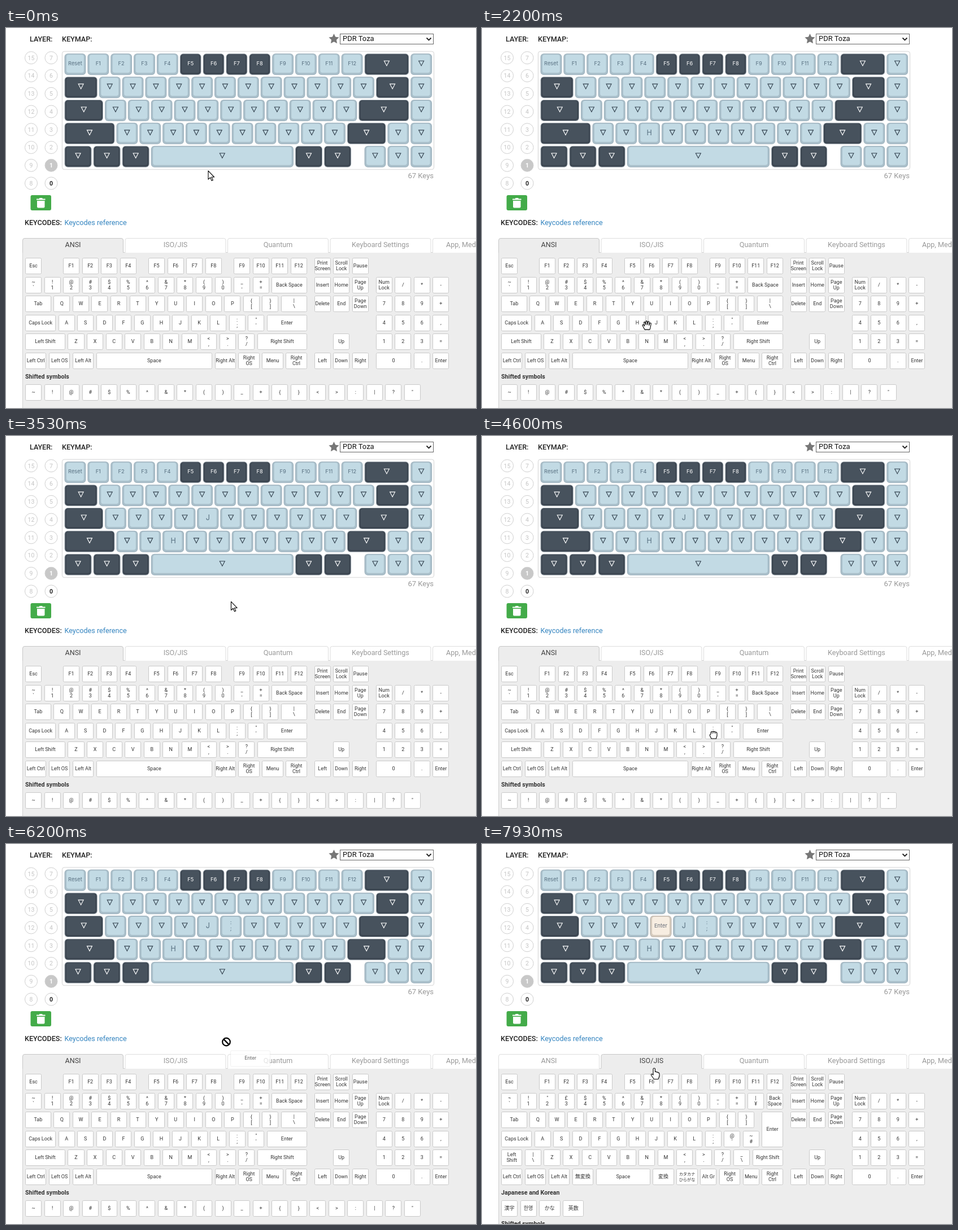
Animation, 832 px wide and 673 px high, one loop 8000 ms. Source, as an HTML page:

```html
<!DOCTYPE html>
<html lang="en">
<head>
<meta charset="utf-8">
<title>Keymap editor</title>
<style>
  html, body { margin: 0; width: 100%; height: 100%; overflow: hidden; background: #fff; }
  svg { display: block; font-family: Roboto, "Noto Sans CJK JP", "Noto Sans CJK KR", "Noto Sans", sans-serif; }
  .legend { font-family: Inter, "Open Sans", sans-serif; }
</style>
</head>
<body>
<svg id="stage" width="832" height="673" viewBox="0 0 832 673">
  <g id="base"></g><g id="ansi"></g><g id="iso"></g><g id="live"></g>
</svg>
<script>
const LOOP = 8000, STEP = 1000 / 15;
const $ = id => document.getElementById(id);
const esc = s => s.replace(/&/g, '&amp;').replace(/</g, '&lt;').replace(/>/g, '&gt;');
const text = (x, y, s, size, fill, extra = '') =>
  `<text x="${x}" y="${y}" font-size="${size}" fill="${fill}" ${extra}>${esc(s)}</text>`;
const rect = (x, y, w, h, r, fill, stroke = 'none', extra = '') =>
  `<rect x="${x}" y="${y}" width="${w}" height="${h}" rx="${r}" fill="${fill}" stroke="${stroke}" ${extra}/>`;
const path = (d, fill, stroke = 'none', extra = '') =>
  `<path d="${d}" fill="${fill}" stroke="${stroke}" ${extra}/>`;
const MID = 'text-anchor="middle"', BOLD = 'font-weight="500"';

// ---- keymap board ----
const THEMES = {
  light: { rim: '#a0b3be', edge: '#a9bfca', face: '#c2dae4', ink: '#587081', mark: '#33424f' },
  dark: { rim: '#a3acb3', edge: '#3c4651', face: '#47525d', ink: '#fff', mark: '#fff' },
  drop: { rim: '#a0b3be', edge: '#aac0b8', face: '#cbecc6', ink: '#587081', mark: '#33424f' },
  cream: { rim: '#c3bab0', edge: '#d5cabd', face: '#f7ede1', ink: '#666c78', mark: '#33424f' }
};
const U = 40.85;
const D = w => [w, 'dark'], plain = n => Array(n).fill([1, 'light']);
const boardRows = [
  [...Array.from({ length: 13 }, (_, i) => [1, i > 4 && i < 9 ? 'dark' : 'light', i ? 'F' + i : 'Reset']), D(2), ...plain(1)],
  [D(1.5), ...plain(12), D(1.5), ...plain(1)],
  [D(1.75), ...plain(11), D(2.25), ...plain(1)],
  [D(2.25), ...plain(10), D(1.75), ...plain(2)],
  [D(1.25), D(1.25), D(1.25), [6.25, 'light'], D(1.25), D(1.25), [.5], ...plain(3)]
];
const keys = [];
boardRows.forEach((row, r) => {
  let u = 0;
  for (const [w, theme, label] of row) {
    if (theme) keys.push({ x: 103.5 + U * u, y: 45.3 + U * r, w: U * w - 3, h: 38, theme, label });
    u += w;
  }
});
const keyAt = (x, y) => keys.find(k => x >= k.x && x < k.x + k.w && y >= k.y && y < k.y + k.h);

function boardKey(k, theme = k.theme, label = k.label) {
  const { rim, edge, face, ink, mark } = THEMES[theme], cx = k.x + k.w / 2, cy = k.y + 17.7;
  const cap = rect(k.x, k.y, k.w, k.h, 6, rim) + rect(k.x + 1, k.y + 1, k.w - 2, k.h - 2, 5, edge)
    + rect(k.x + 3.5, k.y + 2, k.w - 7, k.h - 6, 4, face);
  if (!label) return cap + path(`M${cx - 4.5} ${cy - 4.7}h9l-4.5 8.6z`, 'none', mark, 'stroke-width="1.1"');
  const lines = label.split('\n'), big = label.length < 2;
  return cap + lines.map((s, i) =>
    text(cx, Math.round(cy + (big ? 4.4 : 3.2) + (i - (lines.length - 1) / 2) * 11), s, big ? 12.5 : 9.3, ink, MID + ' class="legend"')).join('');
}

// ---- keycode palette ----
const P = 33.55;
function label(cx, cy, s) {
  const lines = s.split('\n');
  return lines.map((line, i) => text(cx, Math.round(cy + 2.5 + (i - (lines.length - 1) / 2) * 10),
    line, /[ぁ-ヶ]{4}/.test(line) ? 7.2 : 9, '#333', MID)).join('');
}
function paletteKey(x, y, w, h, s) {
  const left = Math.round(x), right = Math.round(x + w), top = Math.round(y);
  return rect(left + .5, top + .5, right - left, h, 2, '#fff', '#c9c9c9')
    + label(x + w / 2 + .5, top + .5 + h / 2, s);
}

// A number sets the width of the key after it; an empty string is a gap.
function row(y, u, items, h = 28) {
  let w = 1, out = '';
  for (const item of items) {
    if (typeof item === 'number') { w = item; continue; }
    if (item) out += paletteKey(34 + P * u, y, P * w - 5.5, h, item);
    u += w; w = 1;
  }
  return out;
}
const pairs = s => s.match(/../gu).map(p => p[0] + '\n' + p[1]);
const rowY = r => 407 + 33.6 * r;

function sharedKeys() {
  const nav = [['Print\nScreen', 'Scroll\nLock', 'Pause'], ['Insert', 'Home', 'Page\nUp'],
    ['Delete', 'End', 'Page\nDown'], [], ['', 'Up'], ['Left', 'Down', 'Right']];
  const pad = [[], ['Num\nLock', '/', '*', '-'], [...'789+'], [...'456,'], [...'123='], [2, '0', '.', 'Enter']];
  const f = n => Array.from({ length: 4 }, (_, i) => 'F' + (n + i));
  return row(rowY(0), 0, ['Esc', '', ...f(1), .5, '', ...f(5), .5, '', ...f(9)])
    + nav.map((n, r) => row(rowY(r), 15.25, n)).join('')
    + pad.map((n, r) => row(rowY(r), 18.5, n)).join('');
}

const TABS = ['ANSI', 'ISO/JIS', 'Quantum', 'Keyboard Settings'];
function tabs(active) {
  const tab = i => {
    const x = 29.5 + 181.5 * i, on = i === active;
    const name = TABS[i] ? text(x + 89, 388, TABS[i], 12.6, on ? '#444' : '#999', MID)
      : text(779, 388, 'App, Media and Mouse', 12.6, '#999');
    return path(`M${x} 398V376q0-3.5 3.5-3.5h171q3.5 0 3.5 3.5V398`, on ? '#ededed' : '#fff', on ? '#c6c6c6' : '#ddd') + name;
  };
  const x = 29.5 + 181.5 * active;
  return rect(29.5, 397.5, 900, 400, 0, '#ededed', '#d2d2d2')
    + [0, 1, 2, 3, 4].map(tab).join('') + rect(x + .5, 396.5, 177, 2, 0, '#ededed');
}
const heading = (y, s) => text(34, y, s, 10.7, '#333', 'font-weight="700"');
const symbols = y => heading(y - 10, 'Shifted symbols') + row(y, 0, [...'~!@#$%^&*()_+{}<>:|?"']);
const letters = [...'QWERTYUIOP'], home = [...'ASDFGHJKL'], low = [...'ZXCVBNM', ...pairs('<,>.?/')];

function ansi() {
  return tabs(0) + sharedKeys()
    + row(rowY(1), 0, [...pairs('~`!1@2#3$4%5^6&7*8(9)0_-+='), 2, 'Back Space'])
    + row(rowY(2), 0, [1.5, 'Tab', ...letters, ...pairs('{[}]'), 1.5, '|\n\\'])
    + row(rowY(3), 0, [1.75, 'Caps Lock', ...home, ...pairs(':;"\''), 2.25, 'Enter'])
    + row(rowY(4), 0, [2.25, 'Left Shift', ...low, 2.75, 'Right Shift'])
    + row(rowY(5), 0, [1.25, 'Left Ctrl', 1.25, 'Left OS', 1.25, 'Left Alt', 6.25, 'Space',
      1.25, 'Right Alt', 1.25, 'Right\nOS', 1.25, 'Menu', 1.25, 'Right\nCtrl'])
    + symbols(631);
}
function iso() {
  return tabs(1) + sharedKeys()
    + row(rowY(1), 0, [...pairs('¬`!1"2£3$4%5^6&7*8(9)0_-+=|¥'), 'Back\nSpace'])
    + row(rowY(2), 0, [1.5, 'Tab', ...letters, ...pairs('{[}]')])
    + row(rowY(2), 13.75, [1.25, 'Enter'], 62)
    + row(rowY(3), 0, [1.75, 'Caps Lock', ...home, ...pairs(':;@\'~#')])
    + row(rowY(4), 0, [1.25, 'Left\nShift', '|\n\\', ...low, '_\n\\', 1.75, 'Right Shift'])
    + row(rowY(5), 0, [1.25, 'Left Ctrl', 1.25, 'Left OS', 1.25, 'Left Alt', 1.25, '無変換', 3, 'Space', 1.25, '変換',
      1.25, 'カタカナ\nひらがな', 'Alt Gr', 1.25, 'Right\nOS', 'Menu', 1.25, 'Right\nCtrl'])
    + heading(621, 'Japanese and Korean')
    + row(631, 0, ['漢字', '한영', 1.25, 'かな', 1.25, '英数'])
    + symbols(686);
}

// ---- page header and layer list ----
function layers() {
  let out = '';
  for (let n = 0; n < 16; n++) {
    const x = n > 7 ? 44.5 : 80, y = 275 - 31.75 * (n % 8);
    const ink = n === 0 ? '#222' : n === 1 ? '#fff' : '#c4c4c4';
    out += `<circle cx="${x}" cy="${y}" r="11" fill="${n === 1 ? '#c8c8c8' : '#fff'}" stroke="#cfcfcf"/>`
      + text(x, y + 3.8, String(n), 10.5, ink, MID + (n < 2 ? ' font-weight="700"' : ''));
  }
  return out;
}
function star(cx, cy) {
  const points = Array.from({ length: 10 }, (_, i) => {
    const a = Math.PI * (i / 5 - .5), r = i % 2 ? 4.7 : 9.5;
    return `${cx + r * Math.cos(a)},${cy + r * Math.sin(a)}`;
  });
  return `<polygon points="${points.join(' ')}" fill="#777"/>`;
}
$('base').innerHTML = text(42, 24, 'LAYER:', 12.6, '#222', BOLD) + text(99, 24, 'KEYMAP:', 12.6, '#222', BOLD)
  + star(580.5, 19.5) + rect(591.5, 10.5, 165, 18, 0, '#fff', '#666')
  + text(596, 23, 'PDR Toza', 13, '#111') + path('M744.5 17.5l4 4 4-4', 'none', '#222', 'stroke-width="1.8"')
  + layers() + rect(99.5, 41.5, 658, 209, 4, '#fff', '#e2e2e2', 'stroke-width="1.6"')
  + keys.map(k => boardKey(k)).join('')
  + text(757, 266, '67 Keys', 13, '#999', 'text-anchor="end"')
  + rect(43.5, 296, 36.5, 27, 3, '#43ab49')
  + path('M54 302.5h4.5l1-1.5h4.5l1 1.5h4.5v2H54zM55 306h13.500V316.500q0 2-2 2H57q-2 0-2-2z', '#fff')
  + text(33, 349, 'KEYCODES:', 12.6, '#222', BOLD) + text(103.5, 349, 'Keycodes reference', 12.6, '#3585c0');
$('ansi').innerHTML = ansi();
$('iso').innerHTML = iso();

// ---- pointer shapes, drawn around their hot spot ----
const outline = d => path(d, '#fff', '#000', 'stroke-width="1.1" stroke-linejoin="round"');
const arrow = outline('M0 0V15L3.6 11.8 6 17.4 8.3 16.4 5.9 11H10.6Z');
const POINTERS = {
  arrow,
  finger: outline('M-2 11V1.5Q-1.700 0 -.3 0Q1.500 0 1.500 1.500V6.500Q4 5.500 4.600 7.500Q7 6.500 7.500 8.500Q9 8 9 10V14L7 19.500H-.5L-5.500 12.500Q-6 10-4 10.300L-2 12Z'),
  grab: outline('M-4 7.5L-8 0Q-8-2-6-1L-4.3 1.3-5.5-5Q-4.5-7-3.3-5L-2-1V-7Q-.8-8.5 .4-7L.8-1 1.8-6.5Q3-8 4-6L3.8 0 5-4Q6.5-5 7.3-3.5L6 4 5 7.5Z'),
  grabbing: outline('M-4 7L-6.5 2Q-7-1-5-1V-4Q-4-6-2.5-5Q-1-7 .5-5.3Q2-6.5 3.2-4.8Q6-5 6-2V2L4.5 7Z')
    + path('M-2.3-4.5v2.5M.5-5v2.5M3.2-4.5v2.5', 'none', '#000'),
  nodrop: '<circle r="6.8" fill="#fff" stroke="#fff" stroke-width="4.4"/><circle r="6.8" fill="none" stroke="#000" stroke-width="2.2"/>'
    + path('M-4.8-4.8L4.8 4.8', 'none', '#000', 'stroke-width="2.4"'),
  copy: rect(2.5, 14.5, 13, 7, 0, 'none', '#000', 'stroke-dasharray="1.5 1.5"') + arrow
    + rect(9.5, 17.5, 10, 10, 0, '#fff', '#000') + path('M14.5 19.5v6M11.5 22.5h6', 'none', '#000', 'stroke-width="1.3"')
};

// ---- motion ----
const TRACK = [
  [0, 358, 253], [133, 348, 240], [467, 296, 173], [870, 296, 174], [1130, 299, 262], [1333, 297, 484],
  [1533, 287, 522], [1730, 281, 523], [2000, 282, 529], [2467, 305.5, 523.5], [2600, 305.5, 523.5],
  [2667, 308, 512], [2800, 339, 179], [2933, 343, 125], [3067, 348, 140], [3200, 352, 148],
  [3867, 445, 439], [4200, 414, 526], [4600, 410, 529], [4667, 410, 526], [4733, 410, 296],
  [4867, 398, 165], [4933, 396, 143], [5133, 397, 148], [5400, 428, 236], [5467, 434, 267],
  [5600, 445, 420], [5933, 476, 522], [6000, 474, 521], [6067, 463, 511], [6333, 317, 190],
  [6467, 317, 190], [6533, 314, 158], [6733, 311, 138], [6933, 311, 138], [7667, 301, 403], [7867, 305, 397]
];
function pointerAt(t) {
  const i = TRACK.findIndex(p => p[0] > t);
  if (i < 1) return TRACK[i < 0 ? TRACK.length - 1 : 0].slice(1);
  const [t0, x0, y0] = TRACK[i - 1], [t1, x1, y1] = TRACK[i], f = (t - t0) / (t1 - t0);
  return [x0 + (x1 - x0) * f, y0 + (y1 - y0) * f];
}
const DRAGS = [
  { press: 2530, lift: 2660, drop: 3060, over: 2990, label: 'J', width: 28, key: keyAt(356, 145) },
  { press: 4530, lift: 4660, drop: 5060, over: 4860, label: ':\n;', width: 28, key: keyAt(397, 145) },
  { press: 5990, lift: 6060, drop: 6930, over: 6520, label: 'Enter', width: 70, key: keyAt(316, 145) }
];
const picked = keyAt(296, 186), PICK = 660, ASSIGN = 1930, TAB_SWITCH = 7860;

function pointerKind(t, y, drag) {
  if (drag) return t < drag.lift ? 'grabbing' : t < drag.over ? 'nodrop' : 'copy';
  if (y > 45 && y < 247 || y > 371 && y < 406) return 'finger';
  return y >= 406 && y < 605 ? 'grab' : 'arrow';
}

function render(t) {
  const [x, y] = pointerAt(t), drag = DRAGS.find(d => t >= d.press && t < d.drop);
  const lifted = drag && t >= drag.lift;
  const [gx, gy] = pointerAt(t - 12);
  const target = lifted && keyAt(gx, gy);
  const faces = new Map();
  if (t >= ASSIGN) faces.set(picked, ['light', 'H']);
  for (const d of DRAGS) if (t >= d.drop) faces.set(d.key, [d.label === 'Enter' ? 'cream' : 'light', d.label]);
  if (target) faces.set(target, ['drop', (faces.get(target) || [])[1]]);

  let out = '';
  for (const [k, [theme, name]] of faces) out += boardKey(k, theme, name || k.label);
  if (t >= PICK && t < ASSIGN)
    out += rect(picked.x + 1, picked.y + 1.2, picked.w - 2, picked.h - 2.4, 5, 'none', '#118011', 'stroke-width="2"');
  const hover = !drag && t < TAB_SWITCH && keyAt(...pointerAt(t - STEP));
  if (hover) out += text(hover.x + hover.w - 7, hover.y + 12, 'X', 9, THEMES[hover.theme].ink, MID);
  if (lifted)
    out += `<g opacity=".72">${rect(gx + 1, gy + 1, drag.width, 28, 2, '#fff', '#ddd', 'stroke-width=".6"')
      + label(gx + 1 + drag.width / 2, gy + 15, drag.label)}</g>`;
  out += `<g transform="translate(${x} ${y})">${POINTERS[pointerKind(t, y, drag)]}</g>`;

  $('ansi').style.display = t < TAB_SWITCH ? '' : 'none';
  $('iso').style.display = t < TAB_SWITCH ? 'none' : '';
  $('live').innerHTML = out;
}

let shown = -1;
function frame() {
  const step = Math.floor((performance.now() % LOOP + 4) / STEP) % (LOOP / STEP);
  if (step !== shown) render((shown = step) * STEP);
  requestAnimationFrame(frame);
}
frame();
</script>
</body>
</html>
```
